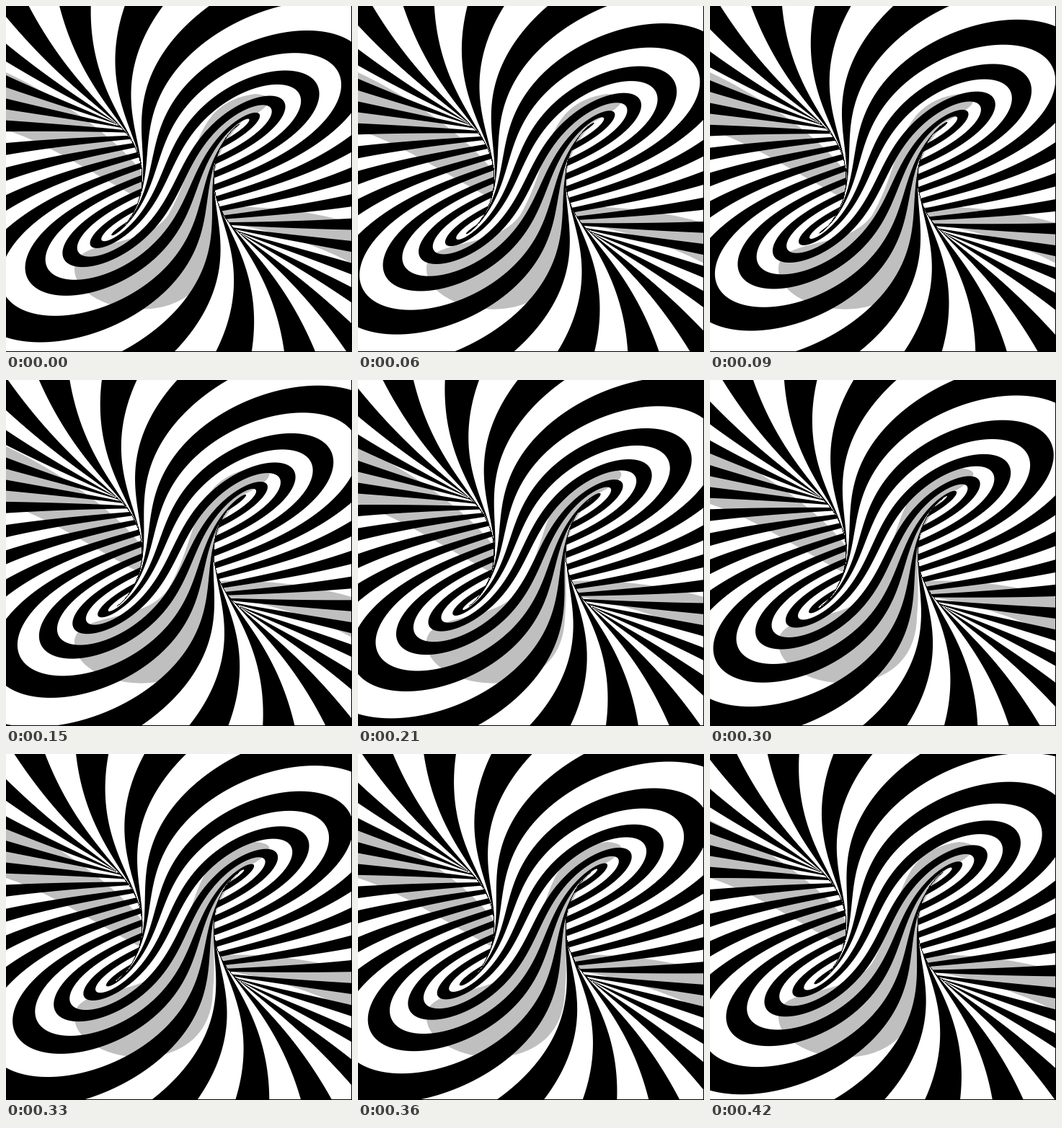
Write an HTML page with a canvas that moves like this. It is 480x480 px and loops after 0.45 s.

```html
<!DOCTYPE html>
<html lang="en">
<head>
<meta charset="utf-8">
<title>Striped torus</title>
<style>
html, body { margin: 0; width: 100%; height: 100%; overflow: hidden; background: #fff; }
canvas { display: block; width: 480px; height: 480px; }
</style>
</head>
<body>
<canvas id="view" width="480" height="480"></canvas>
<script>
const SIZE = 480, LOOP = 450, STEP = 30;
const RING = 1.5;          // torus radius; the tube radius is 1
const EYE = 2.1;           // camera distance from the axis, inside the tube
const FOCAL = 201.9, CENTER = 239;
const STRIPES = 16, SYMMETRY_TIME = 65;
const GREY = 0.25;

const ctx = document.getElementById('view').getContext('2d');
const image = ctx.createImageData(SIZE, SIZE);
const count = SIZE * SIZE;
const phase = new Float32Array(count);
const slope = new Float32Array(count);
const light = new Float32Array(count);
const radius = new Float32Array(count);

// Walk along the ray from the camera to the inner wall of the torus.
function trace(i, j) {
  let dy = (i + 0.5 - CENTER) / FOCAL, dz = (CENTER - j - 0.5) / FOCAL;
  const len = Math.sqrt(1 + dy * dy + dz * dz);
  const dx = -1 / len;
  dy /= len;
  dz /= len;
  let s = 0, x, y, z, rho;
  for (let n = 0; n < 120; n++) {
    x = EYE + dx * s;
    y = dy * s;
    z = dz * s;
    rho = Math.sqrt(x * x + y * y);
    const gap = 1 - Math.sqrt((rho - RING) ** 2 + z * z);
    if (gap < 0.0001) break;
    s += gap;
  }
  const k = j * SIZE + i;
  radius[k] = rho;
  phase[k] = STRIPES * (Math.atan2(y, x) + Math.atan2(z, rho - RING)) / (2 * Math.PI);
}

function change(a, b) {
  const d = phase[a] - phase[b];
  return Math.abs(d - Math.round(d));
}

// Smallest phase change to either neighbour, so folds stay crisp.
function measure(i, j) {
  const k = j * SIZE + i, last = SIZE - 1;
  const h = Math.min(i ? change(k, k - 1) : 1, i < last ? change(k, k + 1) : 1);
  const v = Math.min(j ? change(k, k - SIZE) : 1, j < last ? change(k, k + SIZE) : 1);
  slope[k] = Math.min(0.4, Math.max(0.004, Math.hypot(h, v)));
}

// Red: column, floor and ceiling. Green: the far walls only.
function shadowMask() {
  const c = document.createElement('canvas').getContext('2d');
  c.canvas.width = c.canvas.height = SIZE;
  const fill = (color, path) => {
    c.fillStyle = color;
    c.fill(new Path2D(path));
  };
  fill('#0f0', 'M0 92 C70 125 160 185 195 240 V272 C130 240 70 195 0 172Z');
  fill('#0f0', 'M290 279 Q390 275 480 301 V357 Q400 315 290 298Z');
  fill('#f00', 'M95 365 C95 320 190 340 225 290 C270 215 255 135 345 122 ' +
    'C390 125 350 150 328 160 C270 220 295 260 287 330 C283 460 95 430 95 365Z');
  return c.getImageData(0, 0, SIZE, SIZE).data;
}

function each(fn) {
  for (let j = 0; j < SIZE; j++) for (let i = 0; i < SIZE; i++) fn(i, j);
}

each(trace);
each(measure);
const mask = shadowMask();
each((i, j) => {
  const k = j * SIZE + i, q = k * 4;
  const far = radius[k] > 1.3;
  const dark = mask[q + 3] / 255 * (mask[q] > mask[q + 1] || far ? 1 : 0);
  const border = i === SIZE - 1 || j === SIZE - 1;
  const fold = Math.abs(radius[k] - radius[k + 1]) > 0.2;
  light[k] = border || fold ? 0 : 255 * (1 - GREY * dark);
});

function draw(time) {
  const shift = (time - SYMMETRY_TIME) / LOOP;
  const px = image.data;
  for (let k = 0; k < count; k++) {
    const f = phase[k] + shift;
    const e = Math.abs(f - Math.round(f)) - 0.25;
    const white = Math.min(1, Math.max(0, 0.5 + e / slope[k]));
    const q = k * 4;
    px[q] = px[q + 1] = px[q + 2] = light[k] * white;
    px[q + 3] = 255;
  }
  ctx.putImageData(image, 0, 0);
}

let shown = -1;
function tick(now) {
  const time = Math.floor((now % LOOP) / STEP) * STEP;
  if (time !== shown) draw(shown = time);
  requestAnimationFrame(tick);
}
draw(0);
requestAnimationFrame(tick);
</script>
</body>
</html>
```
